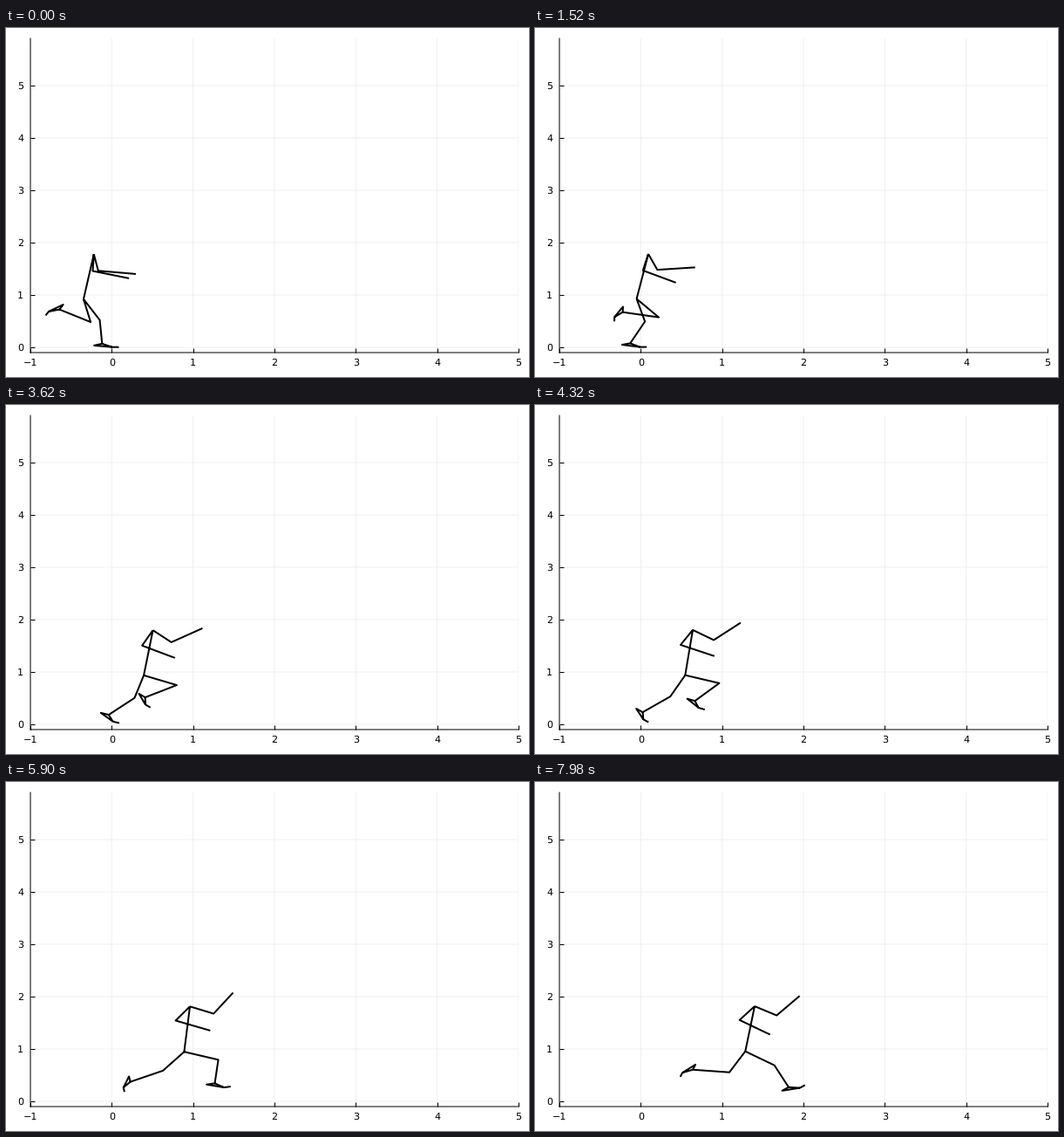
Recreate the animation shown at these times as a matplotlib script. Size 600x400 px, loop 8000 ms.

```python
import numpy as np
import matplotlib.pyplot as plt
from matplotlib.animation import FuncAnimation

TICK = 20          # ms
TICKS = 400
LAST_STEP = 171
TRUNK, UPPER_ARM, FOREARM = 0.869, 0.322, 0.467
THIGH, SHANK, TOE = 0.446, 0.453, 0.084
HEEL, HEEL_ANGLE = 0.104, -153.2   # from the ankle, relative to the sole
BALL, BALL_ANGLE = 0.138, -19.7
TOE_BEND = 27


def glide(t, start, end, bow=0, lag=0):
    """Go from start to end, bowed in the middle and late or early."""
    return (start + (end - start) * t
            + bow * np.sin(np.pi * t) + lag * np.sin(2 * np.pi * t))


def rod(length, angle):
    return length * np.exp(1j * np.radians(angle))


def arm(shoulder, upper, fore):
    elbow = shoulder + rod(UPPER_ARM, upper)
    return [shoulder, elbow, elbow + rod(FOREARM, fore), np.nan]


def leg(hip, thigh, shank, sole, toe):
    knee = hip + rod(THIGH, thigh)
    ankle = knee + rod(SHANK, shank)
    heel = ankle + rod(HEEL, sole + HEEL_ANGLE)
    ball = ankle + rod(BALL, sole + BALL_ANGLE)
    return [hip, knee, ankle, heel, ball, ball + rod(TOE, toe), np.nan,
            ankle, ball, np.nan]


def runner(t):
    hip = glide(t, -0.347, 1.285, 0.011, -0.017) + 1j * glide(t, 0.920, 0.955)
    shoulder = hip + rod(TRUNK, glide(t, 81.6, 82.4, 1.3, -2.2))

    front_arm = arm(shoulder,
                    upper=glide(t, -80.4, -32.9, 16.3, -8.1),
                    fore=glide(t, -7.5, 52.8, 18.1, -8.8))
    back_arm = arm(shoulder,
                   upper=glide(t, -92.5, -125.2, -7.5, 0.9),
                   fore=glide(t, -17.4, -36.6, -1.6, -8.7))

    # The pushing toe stays flat on the ground until the sole has lifted.
    sole = glide(t, -8, -136, 13.2, 14.6)
    push_leg = leg(hip,
                   thigh=glide(t, -63.4, -116.1, -20.5, 8.6),
                   shank=glide(t, -86.4, -186.3, -0.5, -8.9),
                   sole=sole, toe=min(sole + TOE_BEND, 0))
    sole = glide(t, -143.5, 13.5, 6, -7.8)
    swing_leg = leg(hip,
                    thigh=glide(t, -78.7, -36.7, 36, -1.6),
                    shank=glide(t, -212.1, -67.3, 0.7, -8.6),
                    sole=sole, toe=sole + TOE_BEND)
    return np.array([hip, shoulder, np.nan]
                    + front_arm + back_arm + push_leg + swing_leg)


def step_at(tick):
    """Three steps every seven ticks; the third one is held."""
    block, rest = divmod(tick + 1, 7)
    return 3 * block + min(rest, 2) - 1


plt.rcParams.update({"font.family": "DejaVu Sans", "path.snap": False,
                     "text.hinting": "none"})
fig = plt.figure(figsize=(6, 4), dpi=100, facecolor="white")
ax = fig.add_axes([28 / 600, 28 / 400, 560 / 600, 360 / 400])
ax.set(xlim=(-1, 5), ylim=(-0.1, 5.9), xticks=range(-1, 6), yticks=range(6))
ax.set_axisbelow(True)
ax.grid(color="#f0f0f0", linewidth=0.72)
ax.spines[["top", "right"]].set_visible(False)
ax.spines[["left", "bottom"]].set_linewidth(0.72)
ax.tick_params(direction="in", length=3.4, width=0.72, labelsize=8)
ax.tick_params(axis="x", pad=4.7)
ax.tick_params(axis="y", pad=5.6)
body, = ax.plot([], [], color="black", linewidth=1.44, clip_on=False,
                solid_capstyle="butt", solid_joinstyle="round")


def draw(tick):
    points = runner(step_at(tick) / LAST_STEP)
    body.set_data(points.real, points.imag)
    return body,


anim = FuncAnimation(fig, draw, frames=TICKS, interval=TICK,
                     repeat=True, repeat_delay=0)
plt.show()
```
